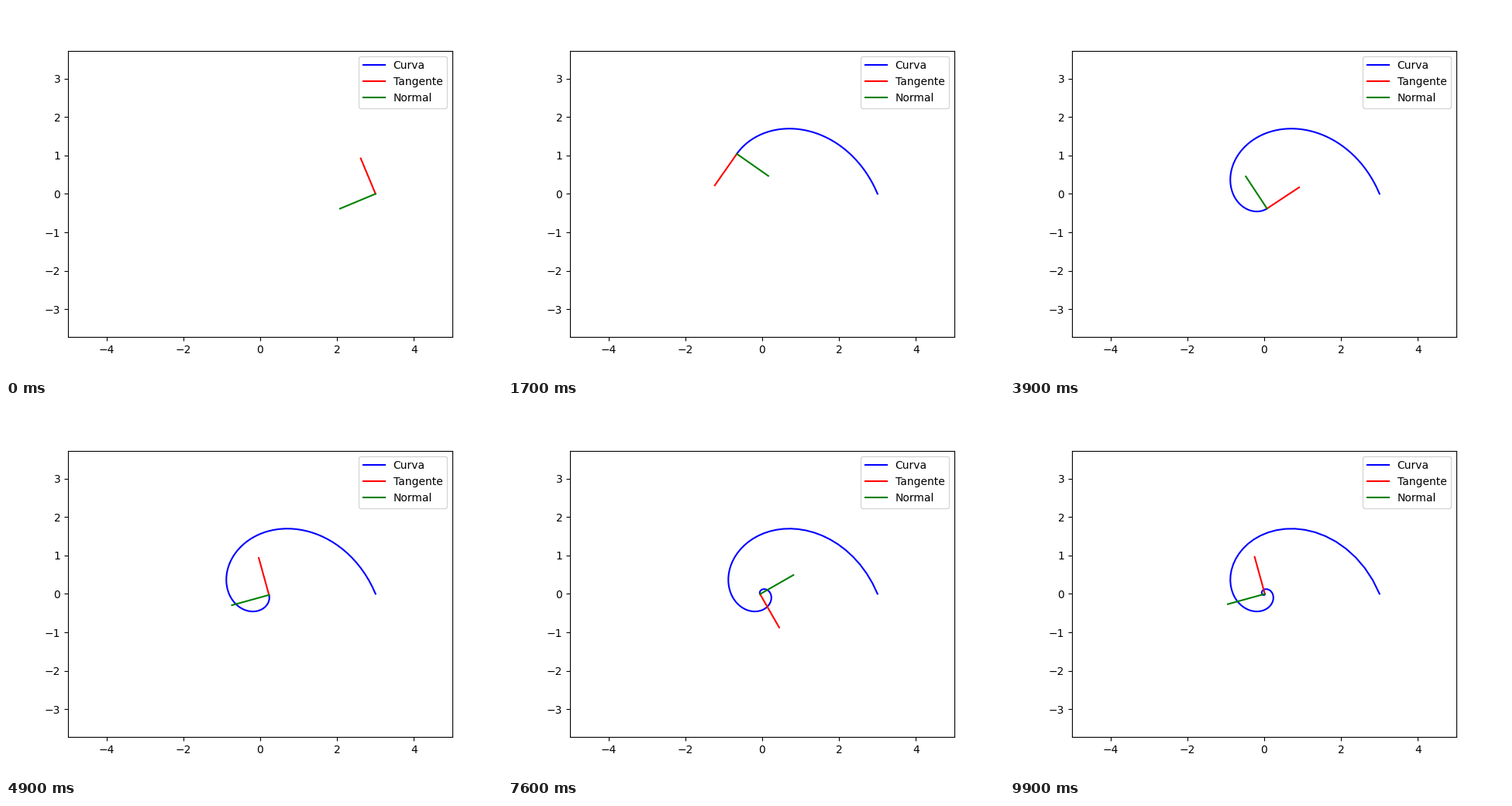
These frames come from a looping animation (640x480 px, 10 s). A matplotlib script:

```python
import numpy as np
import matplotlib.pyplot as plt
from matplotlib.animation import FuncAnimation

FRAMES = 100
SAMPLES = 100
T_END = 4 * np.pi
DECAY = 5 / 12


def spiral(t):
    return 3 * np.exp(-DECAY * t) * np.array([np.cos(t), np.sin(t)])


def tangent(t):
    angle = t + np.pi / 2 + np.arctan(DECAY)
    return np.array([np.cos(angle), np.sin(angle)])


def set_arrow(line, start, direction):
    line.set_data(*np.column_stack([start, start + direction]))


fig, ax = plt.subplots(figsize=(6.4, 4.8), dpi=100)
curve_line, = ax.plot([], [], "b", label="Curva")
tangent_line, = ax.plot([], [], "r", label="Tangente")
normal_line, = ax.plot([], [], "g", label="Normal")

# Equal scale on both axes: 496 x 369.6 px plot area
half_height = 5 * 369.6 / 496
ax.set_xlim(-5, 5)
ax.set_ylim(-half_height, half_height)
ax.set_xticks(range(-4, 5, 2))
ax.set_yticks(range(-3, 4))
ax.legend(loc="upper right")


def update(i):
    t = T_END * i / FRAMES
    point, direction = spiral(t), tangent(t)
    # Resampled every frame, so the polyline gets coarser as it grows
    curve_line.set_data(*spiral(np.linspace(0, t, SAMPLES)))
    set_arrow(tangent_line, point, direction)
    set_arrow(normal_line, point, np.array([-direction[1], direction[0]]))
    return curve_line, tangent_line, normal_line


anim = FuncAnimation(fig, update, frames=FRAMES, interval=100,
                     init_func=lambda: update(0), repeat=True)
plt.show()
```
